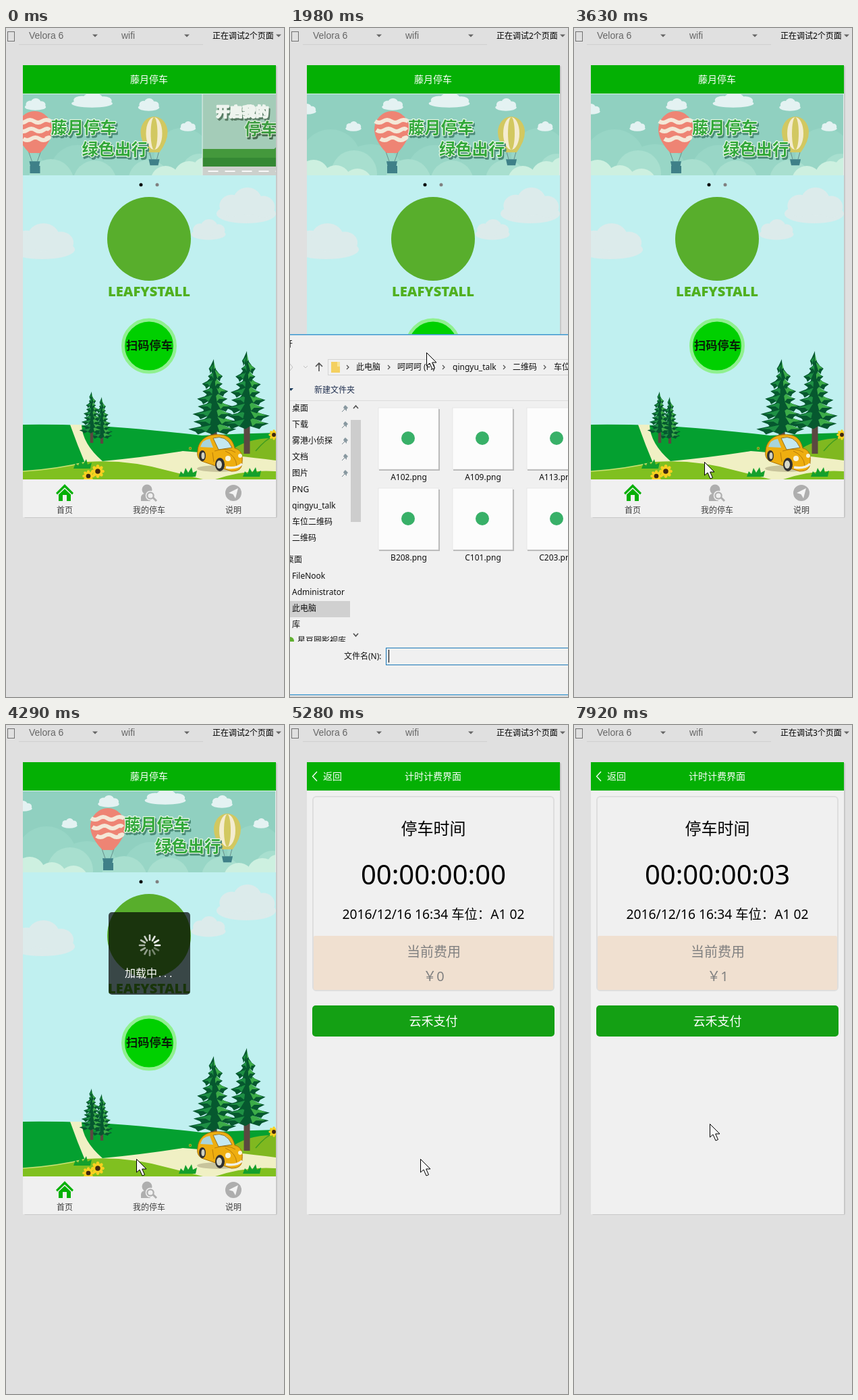
An HTML page that plays this animation: 412x990 px, repeating every 8 s.

```html
<!DOCTYPE html>
<html lang="zh">
<head>
<meta charset="utf-8">
<style>
html,body{margin:0;height:100%;overflow:hidden;background:#e0e0e0}
svg{display:block;width:100vw;height:100vh;font-family:"Noto Sans","Noto Sans CJK SC",sans-serif}
.title{font-weight:900;paint-order:stroke;stroke-linejoin:round}
</style>
</head>
<body>
<svg id="stage" viewBox="0 0 412 990"></svg>
<script>
const BRAND = '藤月停车';

// drawing helpers
const text = (x, y, size, fill, str, more = '') =>
  `<text x="${x}" y="${y}" font-size="${size}" fill="${fill}" ${more}>${str}</text>`;
const mid = (x, y, size, fill, str, more = '') =>
  text(x, y, size, fill, str, 'text-anchor="middle" ' + more);
const rect = (x, y, w, h, fill, more = '') =>
  `<rect x="${x}" y="${y}" width="${w}" height="${h}" fill="${fill}" ${more}/>`;
const oval = (x, y, rx, ry, fill, more = '') =>
  `<ellipse cx="${x}" cy="${y}" rx="${rx}" ry="${ry}" fill="${fill}" ${more}/>`;
const dot = (x, y, r, fill, more) => oval(x, y, r, r, fill, more);
const path = (d, fill, more = '') => `<path d="${d}" fill="${fill}" ${more}/>`;
const line = (d, color, w = 1, more = '') => path(d, 'none', `stroke="${color}" stroke-width="${w}" ${more}`);
const group = (inner, more) => `<g ${more}>${inner}</g>`;
const arrow = x => path(`M${x - 4} 9.5h8l-4 4z`, '#666');

function cloud(x, y, w, h, fill) {
  return group(
    oval(50, 43, 49, 16, fill) + oval(26, 30, 20, 18, fill) +
    oval(52, 23, 24, 23, fill) + oval(78, 32, 19, 18, fill),
    `transform="translate(${x} ${y}) scale(${w / 100} ${h / 60})"`);
}

// a spruce: drooping tiers, each with lit needles on both sides
function tree(x, y, w, h, trunk) {
  const tiers = 8;
  let s = rect(x - w / 16, y + h * .8, w / 8, trunk - y - h * .8, '#5a4840');
  for (let i = tiers; i >= 0; i--) {
    const k = i / tiers, lean = (i % 2 - .5) * w * .06, c = x + lean;
    const a = y + h * .8 * k, b = y + h * (.16 + .8 * k), r = w * (.07 + .41 * k ** .8), d = h * .035;
    s += path(`M${x} ${a}L${c + r * .5} ${b - d * 2}L${c + r} ${b - d}L${c + r * .7} ${b}L${c + r * .6} ${b + d}` +
      `L${c + r * .2} ${b}L${c} ${b + d}L${c - r * .3} ${b}L${c - r * .6} ${b + d}L${c - r * .7} ${b}` +
      `L${c - r} ${b - d}L${c - r * .5} ${b - d * 2}z`, '#06582f');
    s += path(`M${x + r * .1} ${a + d}L${c + r * .85} ${b - d}L${c + r * .45} ${b - d}L${c + r * .3} ${b}z`, '#3cac48');
    s += path(`M${x - r * .1} ${a + d * 2}L${c - r * .25} ${b}L${c - r * .45} ${b - d}L${c - r * .85} ${b - d}z`, '#1e9044');
  }
  return s;
}

function balloon(x, y, rx, ry, color, stripes) {
  const low = y + ry * 1.3, deep = y + ry * 1.75;
  return line(`M${x - rx * .5} ${y + ry * .8}L${x - 4} ${deep}M${x + rx * .5} ${y + ry * .8}L${x + 4} ${deep}`, '#68908c') +
    path(`M${x - rx} ${y}A${rx} ${ry} 0 0 1 ${x + rx} ${y}Q${x + rx} ${y + ry * .6} ${x + 8} ${low}h-16Q${x - rx} ${y + ry * .6} ${x - rx} ${y}`, color) +
    stripes + path(`M${x - 8} ${deep}h16l-2 9h-12z`, '#3f8088');
}

function flower(x, y, r) {
  let s = '';
  for (let a = 0; a < 360; a += 45)
    s += oval(x, y - r * .65, r * .28, r * .45, '#f8d020', `transform="rotate(${a} ${x} ${y})"`);
  return s + dot(x, y, r * .42, '#402810');
}

const tuft = (x, y) => path(`M${x - 14} ${y}l3-8 4 4 3-9 4 7 5-8 2 8 6-3-2 9z`, '#14a02c');

function headline(x, y, size, fill, edge, shade, str) {
  const style = color => `class="title" stroke="${color}" stroke-width="2.5"`;
  return text(x + 2, y + 2.5, size, shade, str, style(shade)) + text(x, y, size, fill, str, style(edge));
}

function bannerOne() {
  const red = [0, 1, 2].map(i =>
    line(`M${126 + i * i * 2} ${138 + i * 13}q6 4 12 0t12 0 12 0 ${13 - i * i * 4} 0`, '#f4e8d8', 6)).join('');
  const gold = oval(328, 156, 12, 24, '#f4ecd0') + oval(328, 156, 5, 24, '#d2c860');
  const puffs = (list, fill) => list.map(c => dot(...c, fill)).join('');
  const title = (x, y, str) => headline(x, y, 24.3, '#32a83a', '#e8f8e8', '#4c8c78', str);
  return rect(25, 98, 375, 120, '#90d0c0') +
    puffs([[60, 195, 45], [120, 222, 50], [215, 215, 42], [290, 220, 44], [370, 190, 42]], '#98d6c6') +
    puffs([[95, 215, 34], [175, 228, 34], [240, 228, 32], [320, 225, 30], [395, 212, 26]], '#a8dfcf') +
    puffs([[35, 218, 23], [68, 225, 22], [100, 230, 22], [345, 226, 22], [380, 220, 23], [402, 208, 16]], '#cdf0e0') +
    cloud(10, 112, 29, 16, '#e4f2f2') + cloud(136, 104, 32, 18, '#e4f2f2') + cloud(205, 96, 62, 22, '#e4f2f2') +
    cloud(304, 104, 32, 19, '#e4f2f2') + cloud(82, 138, 24, 15, '#e4f2f2') + cloud(366, 138, 24, 15, '#e4f2f2') +
    balloon(151, 150, 26, 27, '#ee8474', red) + rect(144, 204, 15, 11, '#3f8088') +
    balloon(328, 154, 20, 23, '#d2c860', gold) +
    title(175, 156, BRAND) + title(221, 188, '绿色出行');
}

function house(x, y, w, h) {
  let s = rect(x, y, w, h, '#e8e4d0') + path(`M${x - 2} ${y}l3-7h${w - 2}l3 7z`, '#d07048');
  for (const dx of [.15, .6]) s += rect(x + w * dx, y + h * .25, w * .25, h * .25, '#4c9898');
  return s + rect(x + w * .4, y + h * .6, w * .22, h * .4, '#388878');
}

function bannerTwo() {
  const wheel = x => dot(x, 211, 6.5, '#303838') + dot(x, 211, 3.5, '#b8c0c0');
  return rect(87, 98, 375, 120, '#a4ccb8') +
    cloud(206, 103, 38, 18, '#d4e8dc') + cloud(302, 107, 28, 19, '#d4e8dc') +
    path('M190 182L250 122 272 103 296 128 345 182z', '#46944c') +
    path('M232 182L260 130 272 103 282 140 318 182z', '#327c40') +
    path('M250 122L272 103 292 123 283 119 276 127 268 118 260 126z', '#f0d070') +
    path('M268 105l4-2 10 10-6 2z', '#f4f0dc') +
    rect(87, 179, 375, 27, '#44983c') + rect(87, 192, 375, 13, '#358834') +
    rect(87, 205, 375, 13, '#ccd0cc') + line('M95 212H462', '#f8f8f8', 2, 'stroke-dasharray="15 10"') +
    [216, 328, 352].map(x => oval(x, 169, 8, 13, '#3c9848') + line(`M${x} 168v16`, '#2c6838')).join('') +
    house(234, 166, 14, 18) + house(297, 173, 19, 20) +
    path('M241 209Q239 194 256 193Q262 182 278 183Q291 183 295 195Q309 198 309 210z', '#ecc040') +
    path('M260 193q5-7 12-7v8zM275 186q10 0 13 9l-13-1z', '#405058') + wheel(254) + wheel(297) +
    line('M375 142l-14-5-6 8M374 150l-13 1-12 3M361 151l-8 7M357 152l6 7', '#181818', 2.5) +
    rect(375, 128, 60, 64, '#dc1828', 'rx="3"') + rect(378, 136, 54, 48, '#e8e8e8') +
    rect(383, 147, 44, 27, '#c8cccc', 'rx="3"') + text(387, 163, 7, '#303030', '扫一扫') + rect(382, 192, 6, 9, '#282828') +
    headline(107, 131, 19.5, '#eef4ee', '#eef4ee', '#587c64', '开启我的') +
    headline(149, 158, 24, '#3c9c40', '#dcecd8', '#486c50', '停车旅途') +
    rect(86, 98, 1, 120, '#e4f0ec');
}

function scenery() {
  return rect(25, 218, 375, 450, '#c0f0f0') +
    cloud(4, 289, 99, 54, '#dcebeb') + cloud(311, 236, 90, 54, '#dcebeb') + cloud(274, 283, 52, 31, '#dcebeb') +
    path('M25 587Q110 586 180 592T290 603Q350 600 400 599V668H25z', '#04a030') +
    path('M330 628Q355 606 400 607V640H325z', '#80b820') +
    path('M95 587h17Q113 615 143 641Q205 635 262 626Q340 632 400 640V668H230L118 646Q106 618 95 587z', '#f0f0c4') +
    path('M25 656Q75 653 120 642Q180 638 240 655L292 668H25z', '#80c020') +
    line('M25 656Q75 653 120 642', '#c8e070', 1.5) +
    path('M310 668Q355 653 400 656V668z', '#80c020') +
    line('M370 626Q385 608 400 602', '#409c20', 1.5) +
    tree(142, 546, 34, 62, 615) + tree(127, 538, 36, 62, 614) +
    tree(308, 490, 74, 112, 608) + tree(357, 478, 72, 116, 630) +
    tuft(114, 652) + tuft(270, 664) + tuft(365, 664) +
    flower(122, 663, 8) + flower(136, 656, 9) + flower(397, 602, 7) + flower(273, 622, 2) + car();
}

function car() {
  return oval(315, 652, 32, 5, '#c8c49c') +
    path('M284 626C285 609 299 600 318 602C333 603 337 614 339 622C349 624 351 633 350 642C350 652 345 656 334 656L290 641C284 637 283 632 284 626z', '#eeae10', 'stroke="#a87008"') +
    path('M307 607Q326 601 335 621L315 624z', '#c4e8f0', 'stroke="#907020"') +
    path('M288 620Q291 609 302 608L307 621z', '#a8d4dc') +
    line('M309 626Q328 620 340 628M306 628L308 642M325 626Q341 633 342 648', '#b87c08') +
    oval(291, 633, 5, 8, '#303030') + oval(292, 633, 2.5, 5, '#d0d0c0') +
    oval(317, 646, 7, 10, '#303030') + oval(316, 646, 4, 6, '#d8d8c8') +
    dot(329, 637, 4, '#f8f4d8') + dot(347, 633, 3, '#f8f4d8') +
    line('M326 650Q341 653 350 645', '#f0f0e8', 3.5);
}

function tabs() {
  const gray = '#aeaeae';
  return rect(25, 668, 375, 56, '#f0f0f0') +
    path('M87 675L100 688 98 690.5 87 680 76 690.5 74 688z', '#04b004') +
    path('M87 682L96 690.5V700H90V691H84V700H78V690.5z', '#04b004') +
    dot(209, 683, 7.5, gray) + path('M200 700V694Q201 689 207 689H214V700z', gray) +
    dot(214, 692, 6.5, gray, 'stroke="#f0f0f0" stroke-width="1.5"') + dot(214, 692, 3.6, '#f0f0f0') +
    line('M218 695L223 700', gray, 3) +
    dot(337, 688, 12, gray) + path('M330 688L344 681 340 696 336.5 690z', '#f4f4f4') +
    mid(87, 718, 12, '#404040', '首页') + mid(212, 718, 12, '#404040', '我的停车') + mid(337, 718, 12, '#404040', '说明');
}

function loader() {
  let spokes = '';
  for (let i = 0; i < 12; i++)
    spokes += line('M213 318V311', '#fff', 2.6, `stroke-linecap="round" opacity="${1 - i * .06}" transform="rotate(${-30 * i} 213 326)"`);
  return rect(152, 277, 121, 122, '#000', 'rx="5" opacity=".7"') + group(spokes, 'id="spin"') +
    text(176, 373, 16, '#fff', '加载中<tspan font-family="Liberation Mono,monospace" font-size="13.5">...</tspan>');
}

function home() {
  const slides = group(bannerOne() + group(bannerTwo(), 'transform="translate(313)"'), 'id="slides"');
  return scenery() + group(slides, 'clip-path="url(#banner)"') +
    dot(200, 232, 2.5, '#000', 'id="dot0"') + dot(224, 232, 2.5, '#000', 'id="dot1"') +
    dot(212, 312, 62, '#58ae2c') +
    mid(212, 396.5, 20.2, '#50b020', 'LEAFYSTALL', 'font-family="Open Sans,sans-serif" font-weight="800"') +
    dot(212, 470.5, 38.5, '#00d000', 'stroke="#90f090" stroke-width="5"') +
    mid(212.5, 476, 17.2, '#082008', '扫码停车', 'font-weight="700"') + tabs() +
    rect(25, 55, 375, 42, '#04b004') + rect(25, 97, 375, 1, '#d8f0e8') +
    mid(212, 81, 14, '#fff', BRAND) + group(loader(), 'id="loader"');
}

function billing() {
  return rect(25, 55, 375, 669, '#f0f0f0') + rect(25, 55, 375, 42, '#04b004') +
    line('M40 69L33.5 76 40 83', '#fff', 1.3) +
    text(49, 81, 14, '#fff', '返回', 'font-weight="500"') + mid(212, 81, 14, '#fff', '计时计费界面', 'font-weight="500"') +
    rect(34, 106, 357, 287, '#f0f0f0', 'rx="5" stroke="#dedede" stroke-width="2"') +
    rect(35, 312, 355, 80, '#f0e0d0', 'rx="2"') +
    mid(212.5, 162, 24, '#000', '停车时间') + mid(212.5, 236, 40, '#000', '', 'id="clock"') +
    mid(212.5, 287, 19.3, '#000', '2016/12/16 16:34 车位：A1 02') +
    mid(213, 343, 20, '#808080', '当前费用') + mid(213, 379, 20, '#808080', '', 'id="fee"') +
    rect(33, 415, 359, 46, '#14a014', 'rx="5"') + mid(212.5, 445, 18, '#fff', '云禾支付');
}

function picker() {
  const ink = '#101010';
  let s = rect(0, 453, 412, 537, '#f0f0f0') + rect(0, 453, 412, 1.5, '#3c98d0') +
    rect(0, 986, 412, 1.5, '#3c98d0') + rect(0, 987.5, 412, 2.5, '#dcdcdc') + text(-8, 472, 12, ink, '开');
  // address bar
  s += line('M0 497l4 5-4 5M20 500l3 3 3-3', '#c0c0c0') + line('M43 508V496M38 501l5-5 5 5', '#505050', 1.6) +
    rect(56.5, 490.5, 360, 23, '#f0f0f0', 'stroke="#d4d4d4"') +
    rect(61, 494, 13, 16, '#f4d060') + rect(70, 494, 4, 7, '#f8e498');
  for (const x of [84, 145, 226, 316, 376]) s += line(`M${x} 499l3 3-3 3`, '#505050', 1.2);
  [[98, '此电脑'], [159, '呵呵呵 (F:)'], [241, 'qingyu_talk'], [330, '二维码'], [391, '车位']]
    .forEach(([x, str]) => s += text(x, 506, 12, ink, str));
  s += path('M-2 533h7l-3.5 4z', '#204060') + text(36, 540, 12, '#203050', '新建文件夹') + rect(0, 551, 412, 1, '#dcdcdc');
  // folder list
  let list = rect(0, 848, 89, 24, '#d0d0d0');
  ['桌面', '下载', '雾港小侦探', '文档', '图片', 'PNG', 'qingyu_talk', '车位二维码', '二维码']
    .forEach((str, i) => {
      const y = 567 + 24 * i;
      list += text(3, y, 12, ink, str);
      if (i < 5) list += line(`M77 ${y + 1}l4-4`, '#788890') + path(`M79 ${y - 5}l5 5 0-3 2-2-4-4-2 2z`, '#8898a0');
    });
  ['桌面', 'FileNook', 'Administrator', '此电脑', '库', '星豆圆影视库']
    .forEach((str, i) => list += text([-6, 3, 3, 3, 3, 11][i], 791 + 24 * i, 12, ink, str));
  list += dot(0, 907, 6, '#60b030');
  s += group(list, 'clip-path="url(#side)"') + rect(90, 580, 15, 151, '#cdcdcd') +
    line('M94 563l3.5-4 3.5 4M94 896l3.5 4 3.5-4', '#505050', 1.6);
  // files
  s += rect(124, 557, 104, 119, '#e0eef0', 'id="hover"');
  ['A102', 'A109', 'A113', 'B208', 'C101', 'C203'].forEach((name, i) => {
    const x = 131 + i % 3 * 110, y = i < 3 ? 562 : 681;
    s += rect(x + 1, y + 2, 90, 91, '#b8b8b8') + rect(x, y, 89, 91, '#fcfcfc', 'stroke="#dcdcdc" stroke-width=".6"') +
      dot(x + 44, y + 45, 10, '#38b068') + mid(x + 45, y + 107, 12, ink, name + '.png');
  });
  return s + text(80, 934, 12, ink, '文件名(N):') +
    rect(142.5, 917.5, 290, 25, '#f0f0f0', 'stroke="#1878b8"') + rect(146, 920, 1, 19, '#000', 'id="caret"');
}

const clip = (id, d) => `<clipPath id="${id}"><path d="${d}"/></clipPath>`;
const arial = 'font-family="Liberation Sans,sans-serif"';
const stage = document.getElementById('stage');
stage.innerHTML =
  clip('side', 'M0 552H89V908H0z') + clip('phone', 'M25 55H400V724H25z') + clip('banner', 'M25 98H400V218H25z') +
  rect(0, 0, 412, 990, '#e0e0e0') +
  rect(2.5, 5.5, 10, 14, 'none', 'stroke="#707070"') + rect(19, 24, 273, 1, '#d0d0d0') +
  text(34, 16, 14, '#666', 'Velora 6', arial) + text(171, 16, 14, '#666', 'wifi', arial) +
  arrow(132) + arrow(268) + arrow(404) + text(306, 16, 12, '#000', '', 'id="debug"') +
  rect(27, 56, 375, 669, '#c8c8c8', 'rx="2"') +
  group(home(), 'id="home" clip-path="url(#phone)"') + group(billing(), 'id="billing"') + group(picker(), 'id="picker"') +
  path('M.5 .5V20L5 16 9 25 12.5 23.5 8.7 15H15z', '#f8f8f8', 'id="cursor" stroke="#000"');

const el = id => document.getElementById(id);
const show = (id, on) => el(id).style.display = on ? '' : 'none';

const STEP = 330, FLIP = 4771;
const moves = [[990, 16, 155], [1320, 174, 355], [1650, 202, 480], [2970, 200, 624],
  [3300, 193, 642], [7260, 193, 628], [7920, 201, 590]];

function draw(t) {
  const paying = t >= 5280, flipped = t >= FLIP;
  show('home', !paying);
  show('billing', paying);
  show('picker', t >= 1980 && t < 3630);
  show('loader', t >= 3960 && t < 4620);
  show('hover', t >= 2970);
  show('caret', t < 3300);
  el('spin').setAttribute('transform', `rotate(${Math.floor((t - 3960) / 83) * 30} 213 326)`);

  const shift = flipped ? 375 * (Math.exp((FLIP - t) / 99) - 1) : -375 * Math.exp(-(t + 124) / 100);
  el('slides').setAttribute('transform', `translate(${shift.toFixed(1)})`);
  el('dot0').setAttribute('fill', flipped ? '#808080' : '#000');
  el('dot1').setAttribute('fill', flipped ? '#000' : '#808080');

  const sec = [5940, 6270, 7920].filter(s => t >= s).length;
  el('clock').textContent = '00:00:00:0' + sec;
  el('fee').textContent = '￥' + (sec ? 1 : 0);
  el('debug').textContent = `正在调试${paying ? 3 : 2}个页面`;

  const spot = moves.filter(m => t >= m[0]).pop();
  show('cursor', spot);
  if (spot) el('cursor').setAttribute('transform', `translate(${spot[1]} ${spot[2]})`);
}

// the screen refreshes once per STEP
function tick() {
  draw(Math.floor(performance.now() % 8000 / STEP) * STEP);
  requestAnimationFrame(tick);
}
tick();
</script>
</body>
</html>
```
